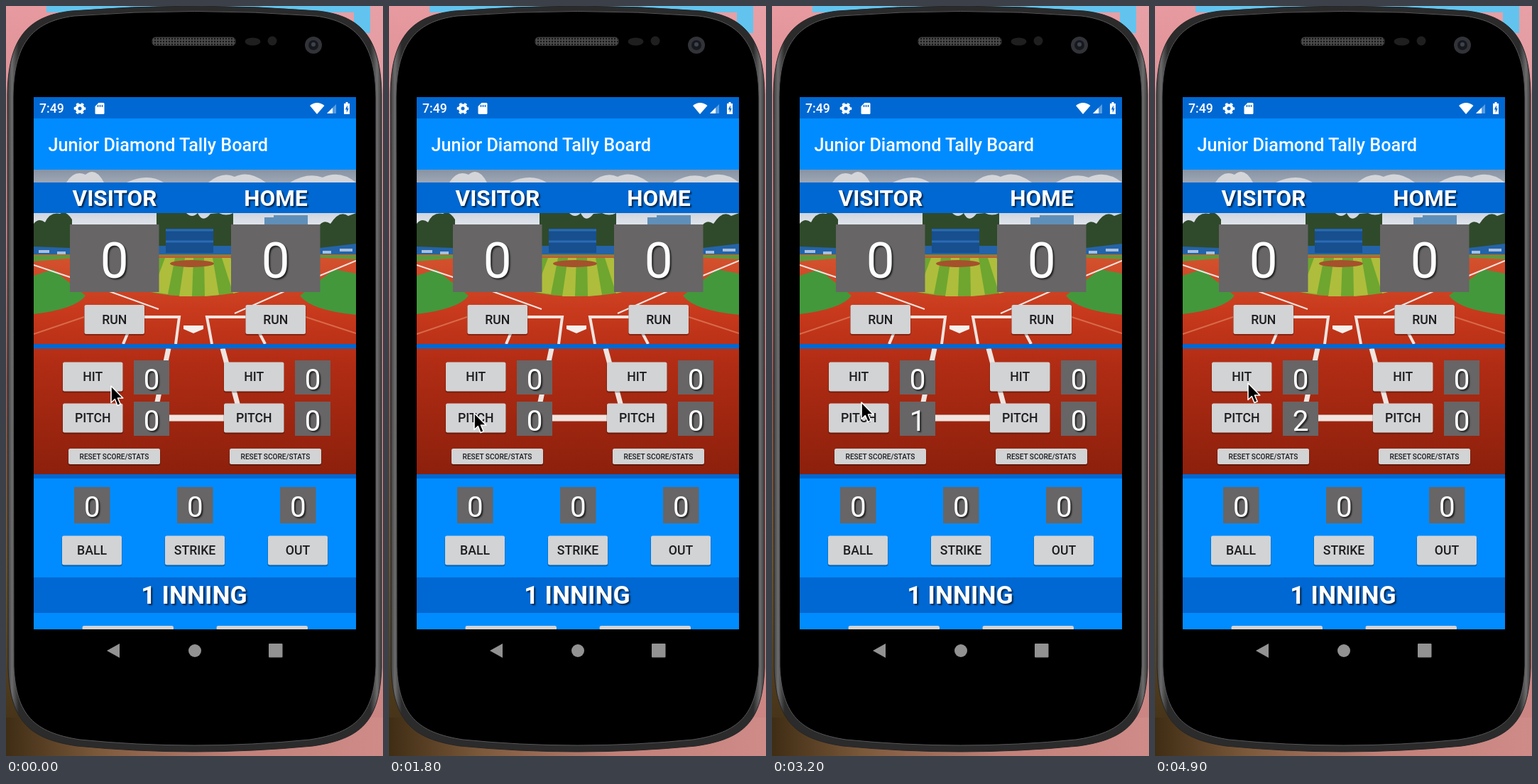
An HTML page that plays this animation: 531 px wide and 1054 px high, repeating every 5000 ms.

```html
<!DOCTYPE html>
<html lang="en">
<head>
<meta charset="utf-8">
<title>Score keeper demo</title>
<style>
  html, body { margin: 0; width: 100%; height: 100%; overflow: hidden; background: #d98a8c; }
  svg { display: block; width: 100vw; height: 100vh; }
  text { font-family: Roboto, sans-serif; fill: #fff; }
  .label { fill: #1d1d1f; font-weight: 500; text-anchor: middle; }
  .mid { text-anchor: middle; }
  .shade { text-shadow: 2px 2px 2px rgba(0,0,0,.65); }
  .head { font-weight: 700; text-anchor: middle; }
</style>
</head>
<body>
<svg viewBox="0 0 531 1054" preserveAspectRatio="none">
  <defs>
    <linearGradient id="wallLeft" x2="0" y2="1">
      <stop offset="0" stop-color="#e79a9f"/><stop offset=".3" stop-color="#c98488"/>
      <stop offset=".5" stop-color="#8a5650"/><stop offset=".75" stop-color="#67522c"/>
      <stop offset="1" stop-color="#3f2d14"/>
    </linearGradient>
    <linearGradient id="wallRight" x2="0" y2="1">
      <stop offset="0" stop-color="#e6a0a6"/><stop offset=".5" stop-color="#d98d90"/>
      <stop offset="1" stop-color="#c98582"/>
    </linearGradient>
    <linearGradient id="floor">
      <stop offset="0" stop-color="#3f2d14"/><stop offset=".25" stop-color="#7d5a3c"/>
      <stop offset=".6" stop-color="#c08078"/><stop offset="1" stop-color="#cf8b88"/>
    </linearGradient>
    <linearGradient id="rim">
      <stop offset="0" stop-color="#3a3a3b"/><stop offset=".012" stop-color="#6c6c6d"/>
      <stop offset=".03" stop-color="#2b2b2c"/><stop offset=".97" stop-color="#2b2b2c"/>
      <stop offset=".988" stop-color="#6c6c6d"/><stop offset="1" stop-color="#3a3a3b"/>
    </linearGradient>
    <linearGradient id="sky" x2="0" y2="1">
      <stop offset="0" stop-color="#8793a4"/><stop offset=".25" stop-color="#aeb5c0"/>
      <stop offset=".6" stop-color="#dde2ea"/><stop offset="1" stop-color="#e9edf2"/>
    </linearGradient>
    <linearGradient id="dirt" x2="0" y2="1">
      <stop offset="0" stop-color="#d4532f"/><stop offset=".25" stop-color="#c93a1d"/>
      <stop offset=".5" stop-color="#b12c14"/><stop offset="1" stop-color="#8c200c"/>
    </linearGradient>
    <pattern id="mesh" width="4" height="4" patternUnits="userSpaceOnUse">
      <rect width="4" height="4" fill="#4b4b4b"/><circle cx="2" cy="2" r="1.2" fill="#151515"/>
    </pattern>
    <clipPath id="content"><rect x="39" y="230" width="454" height="646"/></clipPath>
  </defs>

  <!-- surroundings -->
  <rect width="266" height="1054" fill="url(#wallLeft)"/>
  <rect x="265" width="266" height="1054" fill="url(#wallRight)"/>
  <rect y="1000" width="531" height="54" fill="url(#floor)"/>
  <path d="M57 0H513V38H490V9H57Z" fill="#62c4ee"/>

  <!-- phone body -->
  <path d="M2 125C3 48 28 14 92 7Q265-7 440 7C503 14 528 48 529 125V930C526 1006 500 1030 432 1040Q265 1056 100 1040C33 1030 6 1006 3 930Z" fill="url(#rim)" stroke="#252526"/>
  <path d="M10 128C11 56 34 22 96 14Q265 1 436 14C497 22 520 56 521 128V928C518 997 493 1021 428 1031Q265 1047 104 1031C40 1021 14 997 11 928Z" fill="#000" stroke="#57575a"/>
  <rect x="206" y="44" width="117" height="11.5" rx="4.5" fill="url(#mesh)" stroke="#393939"/>
  <ellipse cx="347.500" cy="50" rx="11" ry="5.500" fill="#1f1f20"/>
  <circle cx="375" cy="49" r="6.500" fill="#1f1f20"/>
  <circle cx="433" cy="55" r="12" fill="#323338"/>
  <circle cx="433" cy="55" r="7" fill="#17181d"/>
  <circle cx="433" cy="54" r="3" fill="#3d434e"/>

  <!-- system and title bars -->
  <rect x="39" y="128" width="454" height="808"/>
  <rect x="39" y="128" width="454" height="31" fill="#0068d2"/>
  <rect x="39" y="158" width="454" height="72" fill="#008cff"/>
  <text x="47" y="150" font-size="17.65" font-weight="500">7:49</text>
  <circle cx="104" cy="144" r="4.500" fill="none" stroke="#fff" stroke-width="4"/>
  <circle cx="104" cy="144" r="7" fill="none" stroke="#fff" stroke-width="2.600" stroke-dasharray="3.665" stroke-dashoffset="1.800"/>
  <path d="M130.500 136H137q1.500 0 1.500 1.500V150.500q0 1.500-1.500 1.500H127q-1.500 0-1.500-1.500V141Z" fill="#fff"/>
  <path d="M129.500 139v3M132.500 139v3M135.500 139v3" stroke="#0068d2" stroke-width="1.500"/>
  <path d="M428 140Q438 132 448.500 140L438 152Z" fill="#fff"/>
  <path d="M465 138V151H452Z" fill="#fff" opacity=".35"/>
  <path d="M460 143V151H452Z" fill="#fff"/>
  <path d="M478.500 137V135H481.500V137H484V152H476V137Z" fill="#fff"/>
  <path d="M481 139.500L477.800 145.500H479.800V150L482.700 144H481Z" fill="#0068d2"/>
  <text x="59.500" y="204" font-size="25.2" font-weight="500">Junior Diamond Tally Board</text>

  <g clip-path="url(#content)">
    <!-- ballpark -->
    <rect x="39" y="230" width="454" height="124" fill="url(#sky)"/>
    <path d="M85 248Q96 230 112 237Q126 225 138 248ZM170 248Q200 234 222 248ZM285 248Q305 232 322 240Q342 230 366 248ZM400 248Q425 233 446 241Q470 230 493 248Z" fill="#d3d5d9"/>
    <g fill="#2f4a2b">
      <path d="M39 306Q46 297 55 304Q62 289 76 292Q84 286 93 300V345H39Z"/>
      <path d="M212 291H254Q262 299 270 291Q277 306 288 292L300 291Q310 296 320 291V340H212Z"/>
      <path d="M440 310Q447 299 457 306Q470 286 482 295L493 291V345H440Z"/>
    </g>
    <path d="M364 297H377V294H425V307H364Z" fill="#5f8fb8"/>
    <path d="M39 338L90 340L215 337H317L442 340L493 334V353H39Z" fill="#2463a8"/>
    <path d="M46 345H61M72 347H84M446 346H458M470 343H488" stroke="#a9bfdc" stroke-width="4"/>
    <rect x="225" y="313" width="67" height="34" fill="#174f8f"/>
    <path d="M225 315H292M225 331H292" stroke="#2b6bb3" stroke-width="3"/>
    <rect x="39" y="349" width="454" height="309" fill="url(#dirt)"/>
    <path d="M39 350H493V356L410 352H120L39 359Z" fill="#5b9a3c"/>
    <path d="M39 379L66 370L112 407Q98 426 39 433ZM493 376L462 370L414 407Q430 428 493 434Z" fill="#43983c"/>
    <path d="M205 354H327L362 392Q320 408 265 408Q210 408 170 392Z" fill="#6ea62f"/>
    <path d="M224 354H238L228 405L206 402ZM252 354H264L262 408H244ZM279 354H291L300 406L280 408ZM304 354H316L341 399L320 404Z" fill="#aebd3c"/>
    <ellipse cx="262" cy="362" rx="31" ry="5" fill="#a5512c"/>
    <g fill="none" stroke="#f1e4df" stroke-width="2">
      <path d="M39 364L90 381L215 426M493 358L442 379L322 432"/>
      <path d="M39 461L110 437M493 460L422 437" stroke="#d86a4b"/>
      <path d="M165 475L181 437H244L239 475M290 475L283 437H345L365 475" stroke-width="4"/>
      <path d="M229 481L211 566M305 481L329 570" stroke-width="7"/>
      <path d="M228 579H309" stroke-width="9"/>
    </g>
    <path d="M250 449H278V454L264 460L250 454Z" fill="#f6efec"/>

    <!-- panels -->
    <g fill="#0068d2">
      <rect x="39" y="248" width="454" height="43"/>
      <rect x="39" y="475" width="454" height="6.500"/>
      <rect x="39" y="658" width="454" height="6"/>
    </g>
    <rect x="39" y="664" width="454" height="212" fill="#008cff"/>
    <rect x="39" y="803" width="454" height="50" fill="#0068d2"/>
    <text class="head shade" x="153" y="281" font-size="31.5">VISITOR</text>
    <text class="head shade" x="380" y="281" font-size="31.5">HOME</text>
    <text class="head shade" x="265" y="840" font-size="35.5">1 INNING</text>
    <g id="widgets"></g>
  </g>

  <!-- navigation bar -->
  <g fill="#929292">
    <path d="M142 906L160 896V916Z"/>
    <circle cx="266" cy="906" r="9"/>
    <rect x="370" y="896" width="19.500" height="19.500" rx="1"/>
  </g>

  <path id="cursor" d="M0 0V23.500L5.300 18.500L9 27.500L13.200 25.700L9.500 17H16.800Z" fill="#000" stroke="#fff" stroke-width="1.600" stroke-linejoin="round"/>
</svg>
<script>
const LOOP = 5000, STEP = 100;
const widgets = document.getElementById('widgets');
const cursor = document.getElementById('cursor');

function add(tag, attrs, text = '') {
  const el = document.createElementNS('http://www.w3.org/2000/svg', tag);
  for (const key in attrs) el.setAttribute(key, attrs[key]);
  el.textContent = text;
  return widgets.appendChild(el);
}

function button(x, y, width, height, label, size = 17.65) {
  add('rect', { x: x - .5, y: y + 1, width: width + 1, height: height + 1, rx: 3, fill: '#000', opacity: .3 });
  const face = add('rect', { x, y, width, height, rx: 2.5, fill: '#d2d3d4' });
  add('text', { class: 'label', x: x + width / 2, y: y + height / 2 + size * .355, 'font-size': size }, label);
  return face;
}

function counter(x, y, width, height, size, baseline) {
  add('rect', { x, y, width, height, fill: '#676566' });
  return add('text', { class: 'mid shade', x: x + width / 2, y: baseline, 'font-size': size }, '0');
}

function team(dx) {
  counter(90 + dx, 307, 125.5, 95, 71, 382);
  button(110.5 + dx, 420, 84.5, 41, 'RUN');
  button(80 + dx, 500.5, 84.5, 41, 'HIT');
  counter(180 + dx, 498, 50, 48, 40.4, 539);
  const face = button(80 + dx, 558.5, 84.5, 41, 'PITCH');
  const count = counter(180 + dx, 556, 50, 48, 40.4, 597);
  button(88 + dx, 622, 129, 22, 'RESET SCORE/STATS', 10.1);
  return { face, count };
}

const visitor = team(0);
team(227);
['BALL', 'STRIKE', 'OUT'].forEach((label, i) => {
  counter(96 + i * 145, 676, 50.5, 51, 40.4, 718);
  button(79 + i * 145, 744.5, 84, 41, label);
});
button(107.5, 871, 128.5, 41, '');
button(296.5, 871, 128.5, 41, '');

// time, x, y of the pointer tip
const path = [
  [0, 148, 534], [300, 148, 534], [900, 120, 572], [2500, 120, 572],
  [3000, 126, 557], [3300, 126, 557], [3600, 121, 572], [4400, 121, 572],
  [4800, 131, 530], [5000, 131, 530]
];
const clicks = [2100, 4000];
const HOLD = 300, FADE = 300;

function pointerAt(t) {
  const i = path.findIndex(p => p[0] > t);
  const [t0, x0, y0] = path[i - 1], [t1, x1, y1] = path[i];
  const u = (t - t0) / (t1 - t0), k = u * u * (3 - 2 * u);
  return [x0 + (x1 - x0) * k, y0 + (y1 - y0) * k];
}

function pressAt(t) {
  return Math.max(...clicks.map(c =>
    t < c ? 0 : Math.max(0, Math.min(1, 1 - (t - c - HOLD) / FADE))));
}

function draw() {
  const t = Math.floor(performance.now() % LOOP / STEP) * STEP;
  const mix = (a, b) => Math.round(a + (b - a) * pressAt(t));
  cursor.setAttribute('transform', `translate(${pointerAt(t)})`);
  visitor.face.setAttribute('fill', `rgb(${mix(210, 168)},${mix(211, 168)},${mix(212, 171)})`);
  visitor.count.textContent = clicks.filter(c => t >= c + STEP).length;
  requestAnimationFrame(draw);
}
draw();
</script>
</body>
</html>
```
